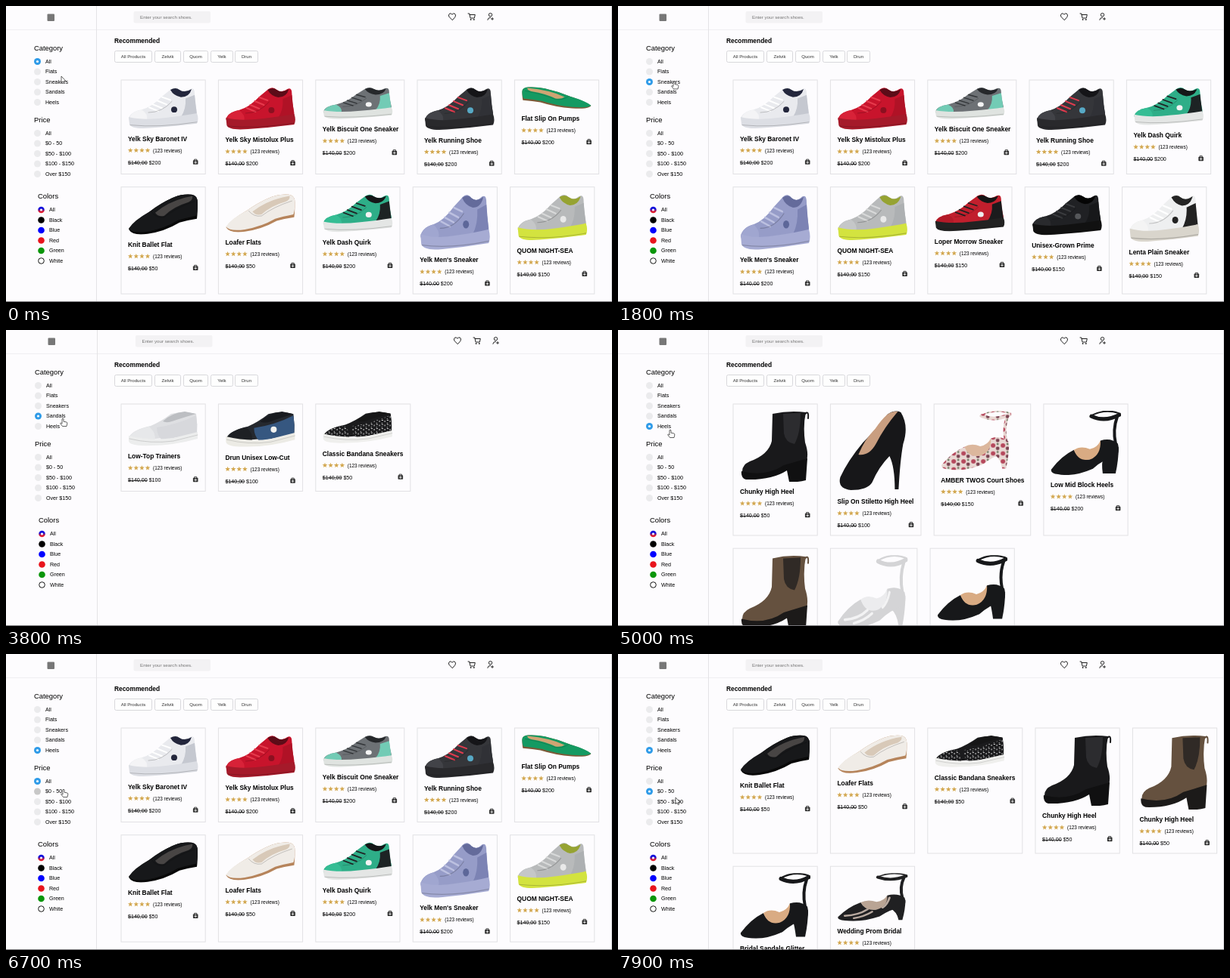
Recreate the animation shown at these times as an HTML page. Size 800 by 392 pixels, loop 8000 ms.

```html
<!DOCTYPE html>
<html lang="en">
<head>
<meta charset="utf-8">
<title>Shoe shop filters</title>
<style>
html, body { margin: 0; width: 100%; height: 100%; overflow: hidden; background: #fdfcfe; }
#stage { display: block; width: 800px; height: 392px; font-family: "Liberation Sans", Arial, sans-serif; }
</style>
</head>
<body>
<svg id="stage" viewBox="0 0 800 392"></svg>
<script>
const LOOP = 8000, STEP = 100;
const stage = document.getElementById('stage');

// ---- Small markup helpers ----
const shape = (d, fill, extra = '') => `<path d="${d}" fill="${fill}" ${extra}/>`;
const line = (d, stroke, width = 1) =>
  shape(d, 'none', `stroke="${stroke}" stroke-width="${width}" stroke-linecap="round"`);
const disc = (x, y, r, fill, extra = '') => `<circle cx="${x}" cy="${y}" r="${r}" fill="${fill}" ${extra}/>`;
const box = (x, y, w, h, fill, extra = '') =>
  `<rect x="${x}" y="${y}" width="${w}" height="${h}" fill="${fill}" ${extra}/>`;
const label = (x, y, size, words, extra = '') =>
  `<text x="${x}" y="${y}" font-size="${size}" ${extra}>${words}</text>`;
const move = (x, y, body) => `<g transform="translate(${x} ${y})">${body}</g>`;

// ---- Shoe pictures, all 93 wide with their own natural height ----
const shoes = {
  sneaker: { h: 57, draw: ([upper, sole, inner, lace, toe, heel, mark]) =>
    shape('M1 43Q3 34 18 31Q32 27 45 13L57 3Q63 -1 68 4Q74 9 82 3Q88 0 88 9Q88 22 91 34V46L3 48Z', upper) +
    shape('M2 42Q4 34 18 31Q27 37 25 45Q12 46 2 42Z', toe) +
    shape('M76 16L88 11 91 38Q80 40 70 41Q77 30 76 16Z', heel) +
    shape('M56 4Q63 0 68 4Q75 9 84 3Q81 14 70 14Q60 12 56 4Z', inner) +
    line('M28 28L40 33M33 24L45 29M39 19L51 24M45 14L56 18', lace, 2) +
    line('M27 35Q45 35 58 20', '#0003', 1) +
    shape('M1 41Q20 46 50 42Q75 39 91 36Q94 44 91 50Q60 54 30 56Q5 58 2 51Z', sole) +
    line('M3 52Q40 56 91 48', '#0003', 1) +
    disc(61, 31, 4, mark) },
  flat: { h: 54, draw: ([upper, inner, sole]) =>
    shape('M1 47Q8 36 28 24Q45 11 62 4Q72 0 84 1Q92 2 92 12Q92 26 91 33Q78 35 68 38Q48 50 26 53Q6 56 1 47Z', sole) +
    shape('M1 46Q8 35 28 24Q45 11 62 4Q72 0 84 1Q92 2 92 12Q92 24 90 29Q76 32 66 35Q48 46 26 50Q6 53 1 46Z', upper) +
    shape('M36 25Q56 8 85 3Q86 8 80 11Q60 17 48 29Q40 31 36 25Z', inner) +
    line('M31 24Q38 33 48 31Q64 18 88 10', '#0003', 1) },
  slipOn: { h: 47, draw: ([upper, sole, inner, toe, side, mark]) =>
    shape('M2 34Q7 25 30 20Q44 14 57 4Q74 0 90 4Q92 18 91 32L4 40Z', upper) +
    shape('M38 22Q66 18 90 6Q92 18 91 30L45 39Q38 32 38 22Z', side) +
    shape('M2 35Q7 25 28 21Q38 30 35 39L4 40Z', toe) +
    shape('M46 14Q57 3 75 1L90 4Q76 8 64 12Q52 17 46 14Z', inner) +
    shape('M1 33Q30 40 60 36L92 28V37Q60 46 30 46Q2 47 1 40Z', sole) +
    line('M2 37Q30 44 60 40L92 32', '#0003', .7) +
    disc(64, 24, mark ? 4 : 0, mark || 'none') },
  boot: { h: 94, draw: ([upper, gore, sole]) =>
    line('M86 4Q91 -1 90 10', upper, 2) +
    shape('M43 4Q66 -1 87 2Q83 20 86 42Q91 56 88 66L58 73Q40 88 4 85Q0 73 13 67Q38 58 42 40Z', upper) +
    shape('M57 4L80 3Q80 30 72 44Q60 42 58 30Z', gore) +
    shape('M2 80Q34 88 58 72L89 63 87 92Q76 95 65 94L62 79Q42 92 8 91Q1 89 2 80Z', sole) },
  pump: { h: 107, draw: ([upper, inner]) =>
    shape('M4 88Q14 66 34 42Q52 24 66 5Q76 -2 84 2Q95 20 87 44Q83 66 81 104H76Q76 74 69 60Q55 74 46 95Q40 105 18 105Q0 103 4 88Z', upper) +
    shape('M28 58Q36 38 50 24Q58 12 66 5Q74 0 80 1Q62 22 51 44Q42 60 28 58Z', inner) },
  strap: { h: 82, draw: ([upper, inner, heel, open]) =>
    line('M54 6Q72 -3 90 3', upper, 2) + line('M54 7Q72 15 91 5', upper, 5) +
    line('M88 8Q82 24 86 42', upper, 4) +
    shape(`M90 46Q90 62 86 80H${86 - heel}Q${84 - heel} 66 70 60Z`, upper) +
    shape('M1 75Q14 58 31 50Q37 64 52 62Q61 54 66 38Q80 34 89 42Q92 54 86 58Q70 62 56 74Q30 85 10 81Q0 80 1 75Z', upper) +
    shape('M31 50Q40 44 52 49Q62 47 66 38Q67 56 53 62Q37 66 31 50Z', inner) +
    (open ? line('M10 73Q28 72 40 62M22 77Q36 74 46 66M69 42Q66 54 60 59', open, 3) : '') }
};

// ---- Products: title, price, title offset, shoe kind, colours, card width ----
const CARD = 111.2, GAP = 17.2;
const product = (title, price, drop, kind, colors, width = CARD, flip = false) =>
  ({ title, price, drop, kind, colors, width, flip });
const black = '#17181a', tan = '#d9ab83';
const P = {
  baronet: product('Yelk Sky Baronet IV', 200, 77.5, 'sneaker', ['#e9eaee', '#dcdee4', '#23263c', '#fff', '#f4f4f6', '#c5c8d0', '#23263c']),
  mist: product('Yelk Sky Mistolux Plus', 200, 79, 'sneaker', ['#c8142c', '#a51a2a', '#5c0c18', '#e63a4c', '#d82238', '#b01226', '#8b1020']),
  biscuit: product('Yelk Biscuit One Sneaker', 200, 65, 'sneaker', ['#6d7175', '#dfe3e0', '#26282b', '#35383b', '#72cbb5', '#72cbb5', '#f4f4f4'], 117),
  running: product('Yelk Running Shoe', 200, 79.5, 'sneaker', ['#35363a', '#29292c', '#151518', '#e03b4e', '#424348', '#303136', '#57a9c5']),
  green: product('Flat Slip On Pumps', 200, 51, 'flat', ['#149a62', '#cfa473', '#7b5a38'], CARD, true),
  ballet: product('Knit Ballet Flat', 50, 76, 'flat', [black, '#484544', '#080808']),
  loafer: product('Loafer Flats', 50, 73, 'flat', ['#f0ece7', '#d8c9b8', '#b6845b']),
  dash: product('Yelk Dash Quirk', 200, 73, 'sneaker', ['#2eae88', '#e4e6e5', '#151718', '#202425', '#35bd94', '#1d2324', '#f3f3f3']),
  mens: product("Yelk Men's Sneaker", 200, 96.5, 'sneaker', ['#969cc8', '#a6abd3', '#646b9b', '#bcc0e0', '#a0a6d0', '#7c83b4', '#5d6799']),
  night: product('QUOM NIGHT-SEA', 150, 84, 'sneaker', ['#b8babb', '#d3e33f', '#96a332', '#d8d9d9', '#c5c7c8', '#adb0b2', '#e9e9e9']),
  loper: product('Loper Morrow Sneaker', 150, 72, 'sneaker', ['#c11f2d', '#222', '#161616', '#222', '#b31a28', '#1b1b1d', '#eee']),
  grown: product('Unisex-Grown Prime', 150, 77, 'sneaker', ['#202124', '#111', '#050505', '#3b3c3f', '#292a2d', '#17181a', '#55575a']),
  lenta: product('Lenta Plain Sneaker', 150, 86, 'sneaker', ['#eeeff0', '#d9d5cc', '#242424', '#fff', '#f4f4f4', '#222', '#222']),
  lowTop: product('Low-Top Trainers', 100, 69, 'slipOn', ['#dedfe2', '#eceded', '#bcbec2', '#e7e8ea', '#d7d8dc', '']),
  lowCut: product('Drun Unisex Low-Cut', 100, 70.5, 'slipOn', ['#25282e', '#ecebe5', '#191b20', '#1e2024', '#365780', '#f2f2ef']),
  bandana: product('Classic Bandana Sneakers', 50, 65.5, 'slipOn', ['#1b1b1d', '#efefed', '#161617', 'url(#dots)', 'url(#dots)', ''], 125),
  chunky: product('Chunky High Heel', 50, 116, 'boot', ['#19191b', '#2c2c2f', '#101011']),
  brown: product('Chunky High Heel', 50, 121, 'boot', ['#65513f', '#302a26', '#1c1a19']),
  stiletto: product('Slip On Stiletto High Heel', 100, 129, 'pump', ['#171719', '#c99e80'], 119.6),
  court: product('AMBER TWOS Court Shoes', 150, 100.5, 'strap', ['url(#floral)', '#dcb79d', 5], 127.5),
  block: product('Low Mid Block Heels', 200, 107, 'strap', [black, tan, 17]),
  silver: product('Silver Evening Sandals', 100, 118, 'strap', ['#d4d4d6', '#ececee', 5, '#f3f3f4'], 114.5),
  bridal: product('Bridal Sandals Glitter', 50, 108.5, 'strap', [black, tan, 12]),
  prom: product('Wedding Prom Bridal', 50, 85.5, 'strap', ['#202022', '#b9a494', 5, '#b9aaa0'])
};
const pick = keys => keys.split(' ').map(k => P[k]);
const lists = {
  all: pick('baronet mist biscuit running green ballet loafer dash mens night'),
  flats: pick('green ballet loafer'),
  sneakers: pick('baronet mist biscuit running dash mens night loper grown lenta'),
  sandals: pick('lowTop lowCut bandana'),
  heels: pick('chunky stiletto court block brown silver bridal'),
  cheap: pick('ballet loafer bandana chunky brown bridal prom')
};

// ---- Cards ----
const star = shape(Array.from({ length: 10 }, (_, i) => {
  const a = i * Math.PI / 5, r = i % 2 ? 1.5 : 3.5;
  return (i ? 'L' : 'M') + (r * Math.sin(a)).toFixed(2) + ' ' + (-r * Math.cos(a)).toFixed(2);
}).join('') + 'Z', '#d3a851');
const bag = line('M-1.6 -2V-3.4H1.6V-2', '#333', .9) + box(-3.3, -2.3, 6.6, 5.6, '#333', 'rx=".8"') +
  line('M0 -.8V2M-1.4 .6H1.4', '#fff', .8);

function card(p, height) {
  const art = shoes[p.kind], y = p.drop;
  return box(0, 0, p.width, height, 'none', 'stroke="#e2e1e4"') +
    `<svg x="9" y="9" width="93" height="${y - 22}" viewBox="0 0 93 ${art.h}" preserveAspectRatio="none">` +
    `<g ${p.flip ? 'transform="translate(93) scale(-1 1)"' : ''}>${art.draw(p.colors)}</g></svg>` +
    label(9, y + 3, 8.4, p.title, 'font-weight="bold"') +
    [12.2, 19.8, 27.4, 35].map(x => move(x, y + 15.7, star)).join('') +
    label(42, y + 18.2, 6.4, '(123 reviews)') +
    label(9, y + 34.3, 7.1, `<tspan text-decoration="line-through">$140,00</tspan> $${p.price}`) +
    move(p.width - 13, y + 31, bag);
}

function cards(list) {
  const rows = [[]];
  let x = 152;
  for (const p of list) {
    if (x + p.width > 793) { rows.push([]); x = 152; }
    rows.at(-1).push([p, x]);
    x += p.width + GAP;
  }
  let y = 98, out = '';
  for (const row of rows) {
    const height = Math.max(...row.map(([p]) => p.drop)) + 45;
    out += row.map(([p, left]) => move(left, y, card(p, height))).join('');
    y += height + GAP;
  }
  return out;
}

// ---- Sidebar and header ----
const ROW = 13.5;
const groups = [
  { title: 'Category', y: 73.5, items: ['All', 'Flats', 'Sneakers', 'Sandals', 'Heels'] },
  { title: 'Price', y: 168.5, items: ['All', '$0 - 50', '$50 - $100', '$100 - $150', 'Over $150'] }
];
const colors = [['All', 'url(#mix)'], ['Black', '#000'], ['Blue', '#00f'], ['Red', '#e8141c'], ['Green', '#0a960a'], ['White', '#fff']];

function sidebar(chosen, cursor) {
  const choices = groups.map((g, n) => label(37, g.y - 14.5, 9.4, g.title) + g.items.map((name, i) => {
    const y = g.y + i * ROW, on = chosen[n] === i;
    const fill = on ? '#2f9be8' : Math.abs(cursor.y - y) <= 5.2 ? '#c8c8c8' : '#ebebed';
    return disc(41.5, y, 4.5, fill) + (on ? disc(41.5, y, 1.6, '#fff') : '') + label(52, y + 2.4, 7.1, name);
  }).join('')).join('');
  const swatches = colors.map(([name, fill], i) => {
    const y = 270 + i * ROW, white = name === 'White';
    return disc(46.5, y, white ? 3.8 : 4.3, fill, white ? 'stroke="#111"' : '') +
      (i ? '' : disc(46.5, y, 1.6, '#fff')) + label(57, y + 2.4, 7.1, name);
  }).join('');
  return choices + label(42, 255, 9.4, 'Colors') + swatches;
}

const icons =
  line('M589 18.5L584.9 14.2Q583.5 11.5 585.8 10Q587.8 9.2 589 11.4Q590.2 9.2 592.2 10Q594.5 11.5 593.1 14.2Z', '#222') +
  line('M610 10H611.8L613 16H618.3L619.3 11.5H612.2', '#222') + disc(613.6, 18, .9, '#222') + disc(617.8, 18, .9, '#222') +
  disc(639.5, 11.7, 2.2, 'none', 'stroke="#222"') + line('M635.8 18.4Q636 15.3 639.5 15.3M642 15.6V18.4M640.6 17H643.4', '#222');
const search = box(168.5, 7, 101.5, 15.5, '#f3f2f4', 'rx="2"') + label(177, 17, 6.2, 'Enter your search shoes.', 'fill="#757575"');
const buttons = [['All Products', 143, 50], ['Zelvik', 196, 35], ['Quom', 234, 33], ['Yelk', 270, 30], ['Drun', 302, 31]]
  .map(([name, x, w]) => box(x + .5, 59.5, w - 1, 15, '#fefefe', 'rx="2" stroke="#d0d0d4" stroke-width=".8"') +
    label(x + w / 2, 69.2, 6.1, name, 'text-anchor="middle" fill="#333"')).join('');

const defs = `<defs>
<linearGradient id="mix" x2="0" y2="1"><stop offset=".35" stop-color="#11d"/><stop offset=".75" stop-color="#e11d2d"/></linearGradient>
<pattern id="dots" width="7" height="6" patternUnits="userSpaceOnUse"><path d="M0 0H7V6H0Z" fill="#1b1b1d"/><path d="M1 1h2v1H1zM4 3l2-1v2zM1 5h1v1H1z" fill="#e8e8e8"/></pattern>
<pattern id="floral" width="13" height="11" patternUnits="userSpaceOnUse"><path d="M0 0H13V11H0Z" fill="#e9d8d3"/><circle cx="4" cy="4" r="3" fill="#b5485c"/><circle cx="10" cy="8" r="2.4" fill="#7a4250"/><circle cx="10" cy="2" r="1.4" fill="#6c7b62"/></pattern>
</defs>`;

// ---- Timeline: clicks and pointer path ----
const clicks = [
  { at: 0, list: 'all', chosen: [0, -1] },
  { at: 900, list: 'flats', chosen: [1, -1], wide: true },
  { at: 1500, list: 'sneakers', chosen: [2, -1] },
  { at: 3200, list: 'sandals', chosen: [3, -1], wide: true },
  { at: 4700, list: 'heels', chosen: [4, -1] },
  { at: 5900, list: 'all', chosen: [4, 0] },
  { at: 7100, list: 'cheap', chosen: [4, 1] }
];
const path = [[0, 73, 93], [300, 72, 93], [700, 69, 83], [1000, 69, 83], [1400, 74, 99], [2700, 74, 101], [3100, 74, 113],
  [3800, 75, 117], [4300, 73, 118], [4600, 69, 129], [5000, 69, 132], [5300, 68, 132], [5800, 60, 166], [6100, 60, 167],
  [6600, 76, 179], [7300, 76, 179], [7800, 76, 190], [8000, 76, 190]];

function pointer(t) {
  const i = path.findIndex(k => k[0] > t), [t0, x0, y0] = path[i - 1], [t1, x1, y1] = path[i];
  const u = (t - t0) / (t1 - t0), e = u * u * (3 - 2 * u);
  return { x: x0 + (x1 - x0) * e, y: y0 + (y1 - y0) * e };
}

function drawPointer({ x, y }) {
  const hand = groups.some(g => g.items.some((_, i) => Math.abs(g.y + i * ROW - y) <= 5.2));
  const d = hand ? 'M-1 .8Q0 -.6 1 .8V4.2L5 5Q6 5.4 5.8 7L5 10.5H-.5L-3.4 6.6Q-3 5.4 -1 7Z'
    : 'M0 0V8.6L2 6.9 3.3 9.8 4.6 9.2 3.4 6.4H6Z';
  return move(x, y, shape(d, '#fff', 'stroke="#222" stroke-width=".7" stroke-linejoin="round"'));
}

// The page widens slightly whenever its scrollbar is not needed.
function draw(t) {
  const { list, chosen, wide } = clicks.findLast(c => c.at <= t);
  const cursor = pointer(t), shift = wide ? 1 : 0;
  stage.innerHTML = defs +
    box(0, 31, 800, 1, '#efeef1') + box(119 + shift, 0, 1, 392, '#e4e3e6') +
    box(54.5 + shift, 10.5, 9.5, 9.5, '#777', 'rx="1"') +
    move(shift * 2.5, 0, search) + move(shift * 7, 0, icons) +
    move(shift, 0, sidebar(chosen, cursor)) +
    label(143, 48.5, 8.4, 'Recommended', 'font-weight="bold"') + buttons + cards(lists[list]) +
    (wide ? '' : box(799, 0, 1, 392, '#d5d4d8')) + box(0, 391, 800, 1, '#77767a') +
    drawPointer(cursor);
}

let shown = -1;
function tick() {
  const t = Math.floor(performance.now() % LOOP / STEP) * STEP;
  if (t !== shown) draw(shown = t);
  requestAnimationFrame(tick);
}
tick();
</script>
</body>
</html>
```
